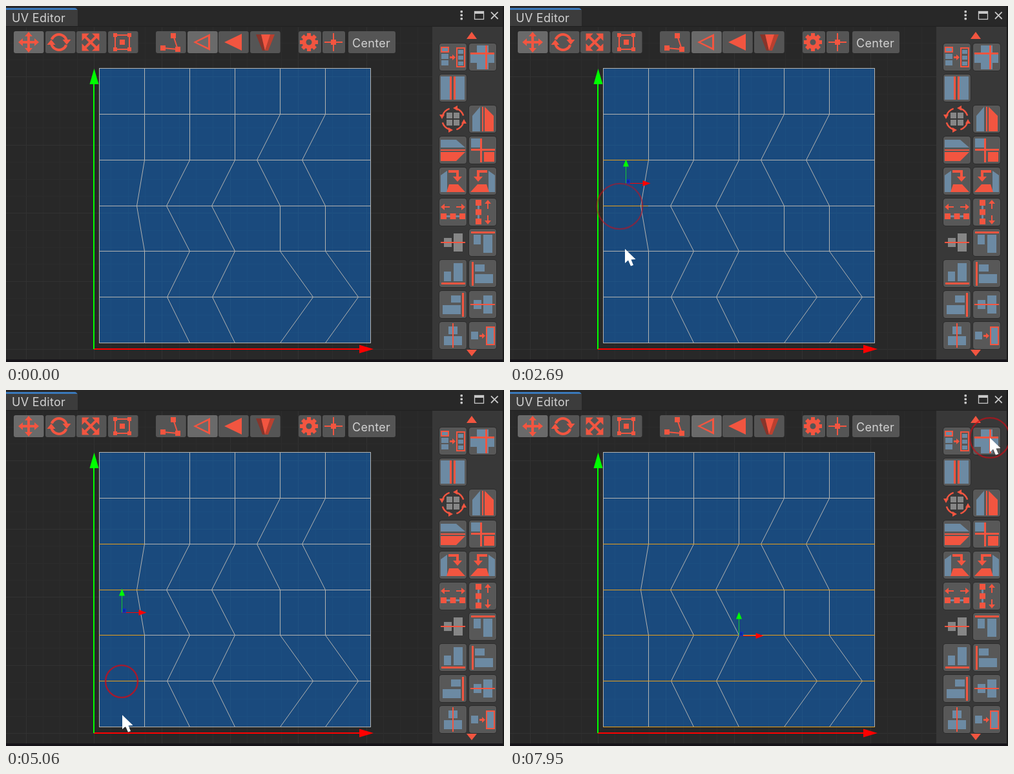
Animation of 771 by 551 pixels, one loop 8000 ms. Source, as an HTML page with a canvas:

```html
<!DOCTYPE html>
<html lang="en">
<head>
<meta charset="utf-8">
<title>UV Editor</title>
<style>
  html, body { margin: 0; width: 100%; height: 100%; overflow: hidden; background: #282828; }
  canvas { display: block; }
</style>
</head>
<body>
<canvas id="stage" width="771" height="551"></canvas>
<script>
const W = 771, H = 551, LOOP = 8000;
const RED = '#f25540', BLUE = '#6c8aa3', GREY = '#868686', WIRE = '#b3b3b0', PICK = '#e8a01c';
const QUARTER = Math.PI / 2;
const screen = document.getElementById('stage').getContext('2d');
const backdrop = document.createElement('canvas');
backdrop.width = W;
backdrop.height = H;
let g = backdrop.getContext('2d');

function box(x, y, w, h, color) {
  g.fillStyle = color;
  g.fillRect(x, y, w, h);
}
function square(x, y, size, color) {
  box(x - size / 2, y - size / 2, size, size, color);
}
function round(x, y, w, h, color, r = 4) {
  g.fillStyle = color;
  g.beginPath();
  g.roundRect(x, y, w, h, r);
  g.fill();
}
function path(pts) {
  g.beginPath();
  for (let i = 0; i < pts.length; i += 2) g.lineTo(pts[i], pts[i + 1]);
}
function poly(color, ...pts) {
  path(pts);
  g.fillStyle = color;
  g.fill();
}
function line(color, width, ...pts) {
  path(pts);
  g.strokeStyle = color;
  g.lineWidth = width;
  g.stroke();
}
function arc(r, from, to, width) {
  g.beginPath();
  g.arc(0, 0, r, from, to);
  g.strokeStyle = RED;
  g.lineWidth = width;
  g.stroke();
}
function frame(x, y, w, h, color, width) {
  g.strokeStyle = color;
  g.lineWidth = width;
  g.strokeRect(x, y, w, h);
}
function at(x, y, draw, angle = 0, flip = 1) {
  g.save();
  g.translate(x, y);
  g.scale(flip, 1);
  g.rotate(angle);
  draw();
  g.restore();
}
function turns(n, draw, offset = 0) {
  for (let i = 0; i < n; i++) at(0, 0, draw, offset + i * 2 * Math.PI / n);
}
// Arrow head with its tip at x, y, pointing up unless turned
function head(x, y, length, half, angle = 0, color = RED) {
  at(x, y, () => poly(color, 0, 0, half, length, -half, length), angle);
}
function label(text, x, y) {
  g.font = '18px Inter, sans-serif';
  g.letterSpacing = '0.3px';
  g.fillStyle = '#d2d2d2';
  g.fillText(text, x, y);
}

// Wireframe
const rowY = i => Math.round(96 + i * 425 / 6) + 0.5;
const colX = i => 144.5 + 70 * i;

function bend(col, row) {
  const right = col > 3;
  if (row === 2) return right ? -36 : 0;
  if (row === 3) return right ? 0 : col > 1 ? -36 : -12;
  if (row === 5) return right ? 51 : col > 1 ? -35 : 0;
  return 0;
}

function grid(x0, y0, x1, y1, minor, major) {
  const step = 26.35;
  for (let i = -6; i < 22; i++) {
    const x = Math.round(136 + i * step), y = Math.round(531 - i * step);
    const color = i % 4 ? minor : major;
    if (x >= x0 && x < x1) box(x, y0, 1, y1 - y0, color);
    if (y >= y0 && y < y1) box(x0, y, x1 - x0, 1, color);
  }
}

function mesh() {
  grid(0, 33, 660, 547, '#2c2c2c', '#323232');
  box(144, 96, 421, 426, '#1a4a7d');
  grid(145, 97, 564, 521, '#1c4e80', '#205282');
  for (let i = 0; i < 7; i++) {
    line(WIRE, 1, 144, rowY(i), 565, rowY(i));
    const pts = [];
    for (let r = 0; r < 7; r++) pts.push(colX(i) + (i % 6 && bend(i, r)), rowY(r));
    line(WIRE, 1, ...pts);
  }
  line('#ff0000', 2, 136, 531, 550, 531);
  line('#00ff00', 2, 136, 531, 136, 115);
  head(136.5, 97, 24, 7, 0, '#00ff00');
  head(569, 531, 22, 6.5, QUARTER, '#ff0000');
}

// Toolbar
function cells(x, n, pitch, on) {
  for (let i = 0; i < n; i++)
    round(Math.round(x + i * pitch), 39, pitch - 2, 34, i === on ? '#6a6a6a' : '#555555', 3);
}
function gear() {
  turns(8, () => box(-3, -14, 6, 7, RED));
  arc(7.5, 0, 7, 6);
}
function toolbar() {
  cells(12, 4, 48.5, 0);
  cells(232, 4, 48.7, 1);
  cells(453, 2, 37);
  cells(530, 1, 75);
  at(35, 56, () => turns(4, () => {
    box(-2, -10, 4, 10, RED);
    head(0, -16, 7, 6);
  }));
  at(82, 56, () => turns(2, () => {
    arc(12, 3.5, 6.1, 4);
    head(12, 4, 8, 6.5, Math.PI);
  }));
  at(131, 56, () => turns(4, () => {
    box(-2, -13, 4, 13, RED);
    head(0, -19, 8, 8);
  }, QUARTER / 2));
  at(180, 56, () => {
    frame(-11, -11, 22, 22, RED, 2);
    turns(4, () => square(11, 11, 6, RED));
    square(0, 0, 8, RED);
  });
  const nodes = [259, 46, 266, 67, 243, 65];
  line(RED, 2, ...nodes);
  for (let i = 0; i < 6; i += 2) square(nodes[i], nodes[i + 1], 8, RED);
  head(290, 56, 26, 13, -QUARTER);
  head(295, 56, 18, 8.5, -QUARTER, '#6a6a6a');
  head(338, 56, 27, 13, -QUARTER);
  poly('#87352b', 387, 44, 398, 44, 401, 69, 397, 69);
  poly(RED, 395, 44, 410, 44, 401, 69);
  poly('#b9402f', 409, 44, 416, 44, 406, 69, 401, 69);
  at(469, 56, gear);
  at(507, 56, () => {
    turns(4, () => box(-1, -14, 2, 14, RED));
    square(0, 0, 8, RED);
  });
  label('Center', 536, 64);
}

function titleBar() {
  round(0, 3, 111, 29, '#3a79bb', [0, 5, 0, 0]);
  box(0, 6, 111, 26, '#3c3c3c');
  box(0, 31, W, 1, '#202020');
  label('UV Editor', 9, 25);
  const ink = '#c8c8c8';
  for (let i = 0; i < 3; i++) round(703.5, 7 + 5.5 * i, 3.5, 3.5, ink, 1);
  frame(725.5, 8.5, 14, 12, ink, 1.3);
  box(725, 8, 15, 4, ink);
  at(756.3, 14.7, () => turns(4, () => box(-0.9, 0, 1.8, 7.5, ink), QUARTER / 2));
}

// Side panel icons, drawn around their own centre
const turned = (draw, angle) => () => at(0, 0, draw, angle);
const mirrored = draw => () => at(0, 0, draw, 0, -1);
const arrowRight = () => {
  box(-5, -1, 5, 3, RED);
  head(4, 0.5, 5, 4.5, QUARTER);
};
const pair = color => {
  box(-14, -7, 12, 14, color);
  box(1, -14, 14, 28, color);
  box(-19, -1, 38, 2, RED);
};
const alignTop = () => {
  box(-18, -17, 37, 3, RED);
  box(-14, -12, 11, 15, BLUE);
  box(1, -12, 14, 28, BLUE);
};
const alignRight = turned(alignTop, QUARTER);
const alignBottom = mirrored(turned(alignTop, Math.PI));
const bluePair = () => pair(BLUE);
const halves = () => {
  poly(BLUE, -19, -16, 5, -16, 19, -4, -19, -4);
  box(-19, -1, 38, 2, RED);
  poly(RED, -19, 3, 19, 3, 5, 17, -19, 17);
};
const quarter = () => {
  box(-18, -18, 15, 14, BLUE);
  box(2, 3, 16, 15, RED);
  box(-4, -18, 3, 37, RED);
  box(-18, -2, 37, 3, RED);
};
const fold = () => {
  poly(BLUE, -19, 17, -19, -9, -9, -16, -9, 17);
  line(RED, 4, -7, -15, 7, -15, 7, -6);
  head(7, 1, 8, 7, Math.PI);
  poly(RED, -6, 5, 8, 5, 19, 17, -10, 17);
};
const spread = () => {
  for (const side of [-1, 1]) {
    line(RED, 2, side * 15, -8, side * 5, -8);
    head(side * 19, -8, 6, 5, side * QUARTER);
  }
  box(-15, 5, 30, 3, BLUE);
  for (let i = -1; i < 2; i++) square(i * 14.5, 6.5, 9, RED);
};
const blocks = () => {
  for (let i = 0; i < 3; i++) box(-18, -15 + 10 * i, 11, 8, BLUE);
  frame(-18, -15, 11, 7, RED, 2);
  arrowRight();
  frame(6, -14, 12, 29, RED, 2);
  for (let i = 0; i < 3; i++) box(8, -11 + 9 * i, 8, 6, BLUE);
};
const crossing = () => {
  box(-19, -6, 37, 15, BLUE);
  box(-9, -18, 18, 37, BLUE);
  box(-19, -7, 37, 3, RED);
  box(4, -18, 3, 37, RED);
};
const seam = () => {
  box(-19, -18, 37, 36, BLUE);
  box(-5, -18, 9, 36, '#585858');
  for (const x of [-5, 1]) box(x, -18, 3, 36, RED);
};
const spin = () => turns(4, () => {
  square(5.5, 5.5, 9, GREY);
  arc(17, 0.35, 1.25, 2.5);
  head(17, 0, 7, 4);
});
const fill = () => {
  box(-18, -6, 11, 12, BLUE);
  arrowRight();
  box(6, -13, 12, 27, BLUE);
  frame(6, -13, 12, 27, RED, 2);
};

function panel() {
  box(660, 32, 109, 515, '#383838');
  const rows = [
    [blocks, crossing], [seam], [spin, turned(halves, -QUARTER)],
    [halves, quarter], [fold, mirrored(fold)], [spread, turned(spread, QUARTER)],
    [() => pair(GREY), alignTop], [alignBottom, mirrored(alignRight)],
    [alignRight, bluePair], [turned(bluePair, QUARTER), fill]
  ];
  rows.forEach((row, r) => row.forEach((icon, c) => {
    const x = 692 + 46 * c, y = Math.round(79 + 47.9 * r);
    const disabled = c === 0 && (r === 2 || r === 6);
    if (!disabled) {
      round(x - 22, y - 22, 44, 44, '#2c2c2c', 5);
      round(x - 21, y - 21, 42, 42, '#585858');
    }
    at(x, y, icon);
  }));
  head(721, 40, 11, 8);
  head(721, 542, 10, 8, Math.PI);
}

function paintBackdrop() {
  box(0, 0, W, H, '#282828');
  mesh();
  titleBar();
  toolbar();
  panel();
  box(0, 547, W, 4, '#161419');
  box(769, 0, 2, H, '#191919');
}

// Each visit: the pointer leaves, arrives, presses and releases at x, y
const visits = [
  { x: 183, y: 240, leave: 70, arrive: 490, press: 1030, release: 1345 },
  { x: 170, y: 310, leave: 1500, arrive: 1800, press: 2110, release: 2445 },
  { x: 179, y: 380, leave: 2480, arrive: 2760, press: 3040, release: 3202 },
  { x: 179, y: 451, leave: 3215, arrive: 3810, press: 4570, release: 4937 },
  { x: 181, y: 522, leave: 4940, arrive: 5190, press: 5690, release: 6003 },
  { x: 743, y: 74, leave: 6220, arrive: 7336, press: 7600, release: 7765 }
];
const ENTRY = { x: 642, y: 58 };
const PICK_DELAY = 70;

const easeOut = p => 1 - (1 - p) ** 2;
const overshoot = p => 1 + 2.6 * (p - 1) ** 3 + 1.6 * (p - 1) ** 2;

function pointer(t) {
  const i = visits.findLastIndex(v => t >= v.leave);
  if (i < 0) return;
  const to = visits[i], from = i ? visits[i - 1] : ENTRY;
  const p = Math.min(1, (t - to.leave) / (to.arrive - to.leave));
  const k = i ? easeOut(p) : overshoot(p);
  at(Math.round(from.x + (to.x - from.x) * k), Math.round(from.y + (to.y - from.y) * k), () =>
    poly('#ffffff', 0, 0, 0, 22, 5, 17.5, 9, 26.5, 13, 25, 9.5, 16.5, 16.5, 16));
}

function ring(t, { x, y, press, release }) {
  const p = Math.max(0, (t - release) / 403);
  if (t < press || p >= 1) return;
  g.globalAlpha = 1 - 0.8 * p;
  g.strokeStyle = '#d20a14';
  g.lineWidth = 2.6 - 0.6 * p;
  g.beginPath();
  g.arc(x, y, 8.5 + 31.5 * easeOut(p), 0, 7);
  g.stroke();
  g.globalAlpha = 1;
}

function gizmo(x, y) {
  line('#14c832', 1, x, y, x, y - 27);
  line('#ff0000', 1, x, y, x + 28, y);
  head(x, y - 37, 11, 4.5, 0, '#00ff00');
  head(x + 38, y, 12, 4.5, QUARTER, '#ff0000');
  box(x + 0.5, y - 6, 6, 6, '#0a2f9c');
  frame(x + 1, y - 5.5, 5, 5, '#1230d0', 1);
}

function selection(t) {
  const edges = visits.slice(0, 5), n = edges.filter(v => t >= v.press + PICK_DELAY).length;
  if (!n) return;
  const whole = t >= visits[5].release + PICK_DELAY / 2;
  for (let i = 0; i < n; i++) line(PICK, 1, 144, rowY(2 + i), whole ? 565 : 214, rowY(2 + i));
  gizmo(colX(whole ? 3 : 0.5), Math.floor((rowY(2) + rowY(n + 1)) / 2) + 0.5);
}

paintBackdrop();
g = screen;
function tick() {
  const t = performance.now() % LOOP;
  g.drawImage(backdrop, 0, 0);
  selection(t);
  visits.forEach(v => ring(t, v));
  pointer(t);
  requestAnimationFrame(tick);
}
tick();
</script>
</body>
</html>
```
